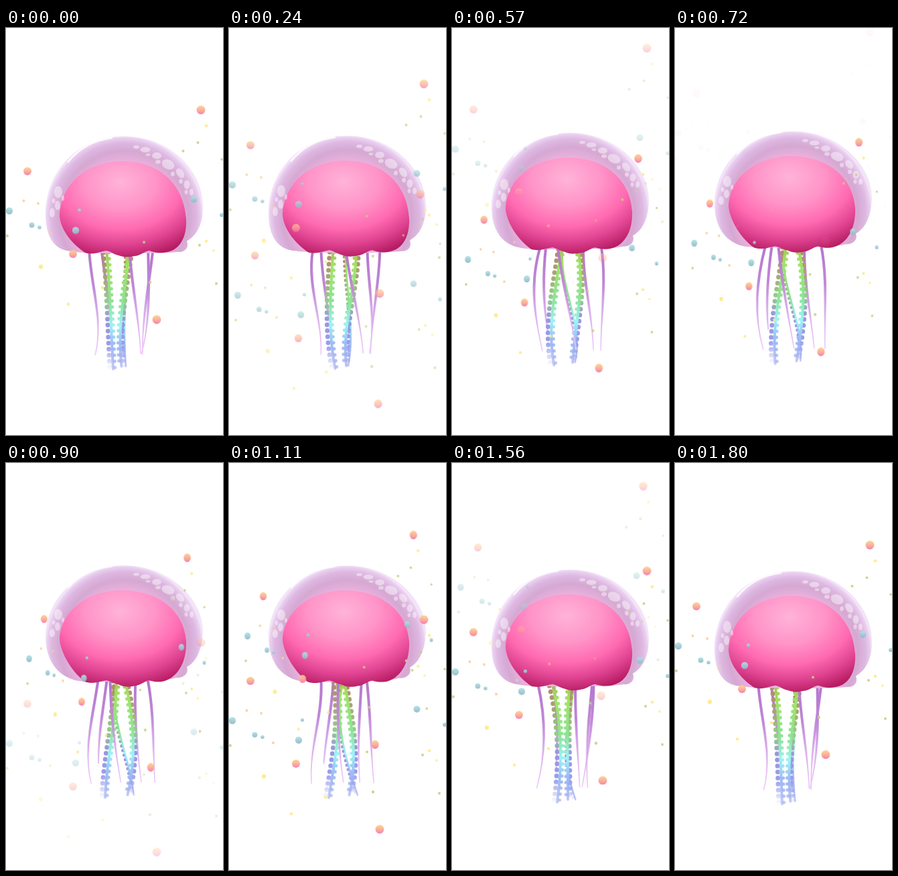
Write an HTML page without scripts that moves like this. It is 324 px wide and 605 px high and loops after 1.83 s.

```html
<!DOCTYPE html>
<html lang="en">
<head>
<meta charset="utf-8">
<title>Jellyfish</title>
<style>
html, body { margin: 0; width: 100%; height: 100%; overflow: hidden; background: #fff; }
svg { display: block; width: 324px; height: 605px; }

.lift, .squash { animation: lift 915ms cubic-bezier(.364,0,.636,1) -1770ms infinite alternate; }
.squash { animation-name: squash; }
@keyframes lift { to { transform: translateY(-10px); } }
@keyframes squash { to { transform: translateY(7.7px) scaleY(.89); } }

/* bubbles rest for the last 30ms of every loop */
.rise, .wrap, .narrow { animation: rise 1830ms linear infinite; }
.wrap { animation-name: wrap; }
.narrow { animation-name: narrow; transform-origin: 174px 0; }
@keyframes rise {
  0% { transform: translateY(164px); opacity: 0; }
  13% { opacity: .65; }
  20%, 70% { opacity: 1; }
  85% { opacity: .45; }
  93% { opacity: 0; }
  98.36%, 100% { transform: translateY(-126px); opacity: 0; }
}
@keyframes wrap {
  0% { transform: translateY(0); opacity: 1; }
  13% { opacity: .78; }
  31% { opacity: .4; }
  41% { opacity: 0; }
  43.7% { transform: translateY(-128.800px); opacity: 0; }
  43.71% { transform: translateY(161px); opacity: 0; }
  49% { opacity: .35; }
  60% { opacity: 1; }
  98.36%, 100% { transform: translateY(0); opacity: 1; }
}
@keyframes narrow {
  49.18% { transform: scaleX(.825); }
  98.36%, 100% { transform: none; }
}

.strands, .ribbons { fill: none; stroke-linecap: round; }
.strands { stroke: url(#violet); stroke-width: 1.7; }
.root { stroke: url(#violetRoot); stroke-width: 4; }
.core { stroke: url(#rainbow); stroke-width: 4; }
.frill, .edge { stroke: url(#frill); stroke-width: 7; stroke-dasharray: 0 9; }
.edge { stroke: url(#rainbow); stroke-width: 5; }
.slim .core { stroke-width: 2.5; }
.slim .frill { stroke-width: 5; stroke-dasharray: 0 7; }

.o { fill: url(#orange); }
.t { fill: url(#teal); }
.y { fill: #fdeb8c; }
.g { fill: #c9d184; }
.p { fill: #fbcf94; }
</style>
</head>
<body>
<svg viewBox="0 0 324 605">
<defs>
  <linearGradient id="orange" x2="0" y2="1">
    <stop offset=".1" stop-color="#fdcb8c"/><stop offset=".55" stop-color="#fba795"/><stop offset="1" stop-color="#f377ab"/>
  </linearGradient>
  <linearGradient id="teal" x2="0" y2="1">
    <stop offset=".1" stop-color="#a9e0e0"/><stop offset="1" stop-color="#97b6c8"/>
  </linearGradient>
  <linearGradient id="violet" gradientUnits="userSpaceOnUse" x1="0" y1="330" x2="0" y2="486">
    <stop stop-color="#b474cc"/><stop offset=".5" stop-color="#cd97e2"/><stop offset="1" stop-color="#f0cffa"/>
  </linearGradient>
  <linearGradient id="violetRoot" gradientUnits="userSpaceOnUse" x1="0" y1="330" x2="0" y2="455">
    <stop stop-color="#b474cc"/><stop offset=".45" stop-color="#c08ad8"/><stop offset="1" stop-color="#dcaeee" stop-opacity="0"/>
  </linearGradient>
  <linearGradient id="rainbow" gradientUnits="userSpaceOnUse" x1="0" y1="334" x2="0" y2="508">
    <stop stop-color="#a8c456"/><stop offset=".12" stop-color="#a0e466"/><stop offset=".42" stop-color="#8ee394"/>
    <stop offset=".62" stop-color="#9af4f4"/><stop offset=".78" stop-color="#9dbcf4"/><stop offset="1" stop-color="#8f9ae8" stop-opacity=".5"/>
  </linearGradient>
  <linearGradient id="frill" gradientUnits="userSpaceOnUse" x1="0" y1="334" x2="0" y2="508">
    <stop stop-color="#b0886c"/><stop offset=".22" stop-color="#a9a674"/><stop offset=".42" stop-color="#93ce8c"/>
    <stop offset=".58" stop-color="#9a94e0"/><stop offset=".8" stop-color="#9a9eec"/><stop offset="1" stop-color="#9a9eec" stop-opacity="0"/>
  </linearGradient>
  <radialGradient id="dome" cx=".5" cy="0" r=".5" gradientTransform="translate(0 .69) scale(1 1.38)">
    <stop offset=".68" stop-color="#ebb2de"/><stop offset=".82" stop-color="#d5a8d2"/>
    <stop offset=".92" stop-color="#ddb8e1"/><stop offset=".98" stop-color="#ead0f0"/><stop offset="1" stop-color="#f3e4f7"/>
  </radialGradient>
  <radialGradient id="pink" cx=".48" cy=".22" r=".8">
    <stop stop-color="#ffb3d8"/><stop offset=".35" stop-color="#ff94c8"/><stop offset=".62" stop-color="#ff6ab1"/>
    <stop offset=".82" stop-color="#de4290"/><stop offset="1" stop-color="#b61c62"/>
  </radialGradient>

  <!-- each curve sways as a cosine part plus a sine part -->
  <path id="s1" d="M131 332C129.2 385 130.3 435 130 486">
    <animate attributeName="d" additive="sum" dur="1.83s" begin="0s" repeatCount="indefinite" calcMode="spline" keyTimes="0;.5;1" keySplines=".364 0 .636 1;.364 0 .636 1" values="M-6.7 0C-2 0 15.6 0 3.2 0;M6.7 0C2 0 -15.6 0 -3.2 0;M-6.7 0C-2 0 15.6 0 3.2 0"/>
    <animate attributeName="d" additive="sum" dur="1.83s" begin="-1.3725s" repeatCount="indefinite" calcMode="spline" keyTimes="0;.5;1" keySplines=".364 0 .636 1;.364 0 .636 1" values="M-2 0C-15.6 0 -1.1 0 6.8 0;M2 0C15.6 0 1.1 0 -6.8 0;M-2 0C-15.6 0 -1.1 0 6.8 0"/>
  </path>
  <path id="s2" d="M147 332C147 374 147 415 148 456">
    <animate attributeName="d" additive="sum" dur="1.83s" begin="0s" repeatCount="indefinite" calcMode="spline" keyTimes="0;.5;1" keySplines=".364 0 .636 1;.364 0 .636 1" values="M-4.1 0C1 0 9.1 0 9.8 0;M4.1 0C-1 0 -9.1 0 -9.8 0;M-4.1 0C1 0 9.1 0 9.8 0"/>
    <animate attributeName="d" additive="sum" dur="1.83s" begin="-1.3725s" repeatCount="indefinite" calcMode="spline" keyTimes="0;.5;1" keySplines=".364 0 .636 1;.364 0 .636 1" values="M-9.1 0C-12.2 0 -7.8 0 -1.7 0;M9.1 0C12.2 0 7.8 0 1.7 0;M-9.1 0C-12.2 0 -7.8 0 -1.7 0"/>
  </path>
  <path id="s3" d="M170 332C172.3 385 180.7 435 186 484">
    <animate attributeName="d" additive="sum" dur="1.83s" begin="0s" repeatCount="indefinite" calcMode="spline" keyTimes="0;.5;1" keySplines=".364 0 .636 1;.364 0 .636 1" values="M14.4 0C15.6 0 18.6 0 15 0;M-14.4 0C-15.6 0 -18.6 0 -15 0;M14.4 0C15.6 0 18.6 0 15 0"/>
    <animate attributeName="d" additive="sum" dur="1.83s" begin="-1.3725s" repeatCount="indefinite" calcMode="spline" keyTimes="0;.5;1" keySplines=".364 0 .636 1;.364 0 .636 1" values="M-7 0C-1.9 0 4.6 0 5.5 0;M7 0C1.9 0 -4.6 0 -5.5 0;M-7 0C-1.9 0 4.6 0 5.5 0"/>
  </path>
  <path id="s4" d="M203 330C201.9 381 205.3 432 202 484">
    <animate attributeName="d" additive="sum" dur="1.83s" begin="0s" repeatCount="indefinite" calcMode="spline" keyTimes="0;.5;1" keySplines=".364 0 .636 1;.364 0 .636 1" values="M9.3 0C10.9 0 10.8 0 .5 0;M-9.3 0C-10.9 0 -10.8 0 -.5 0;M9.3 0C10.9 0 10.8 0 .5 0"/>
    <animate attributeName="d" additive="sum" dur="1.83s" begin="-1.3725s" repeatCount="indefinite" calcMode="spline" keyTimes="0;.5;1" keySplines=".364 0 .636 1;.364 0 .636 1" values="M-3.7 0C-3.2 0 9.6 0 10 0;M3.7 0C3.2 0 -9.6 0 -10 0;M-3.7 0C-3.2 0 9.6 0 10 0"/>
  </path>
  <path id="s5" d="M215 330C217.3 381 210.7 433 213 485">
    <animate attributeName="d" additive="sum" dur="1.83s" begin="0s" repeatCount="indefinite" calcMode="spline" keyTimes="0;.5;1" keySplines=".364 0 .636 1;.364 0 .636 1" values="M4.3 0C-3.6 0 -7.8 0 -9.1 0;M-4.3 0C3.6 0 7.8 0 9.1 0;M4.3 0C-3.6 0 -7.8 0 -9.1 0"/>
    <animate attributeName="d" additive="sum" dur="1.83s" begin="-1.3725s" repeatCount="indefinite" calcMode="spline" keyTimes="0;.5;1" keySplines=".364 0 .636 1;.364 0 .636 1" values="M10.1 0C13.3 0 9.3 0 6.2 0;M-10.1 0C-13.3 0 -9.3 0 -6.2 0;M10.1 0C13.3 0 9.3 0 6.2 0"/>
  </path>
  <path id="r1" d="M156.5 334C159.8 391 152.7 448 153 507">
    <animate attributeName="d" additive="sum" dur="1.83s" begin="0s" repeatCount="indefinite" calcMode="spline" keyTimes="0;.5;1" keySplines=".364 0 .636 1;.364 0 .636 1" values="M-7.1 0C-5 0 3.1 0 6 0;M7.1 0C5 0 -3.1 0 -6 0;M-7.1 0C-5 0 3.1 0 6 0"/>
    <animate attributeName="d" additive="sum" dur="1.83s" begin="-1.3725s" repeatCount="indefinite" calcMode="spline" keyTimes="0;.5;1" keySplines=".364 0 .636 1;.364 0 .636 1" values="M3.6 0C-7.6 0 -12.2 0 .6 0;M-3.6 0C7.6 0 12.2 0 -.6 0;M3.6 0C-7.6 0 -12.2 0 .6 0"/>
  </path>
  <path id="r2" d="M181 334C183.8 390 180.7 446 177 503">
    <animate attributeName="d" additive="sum" dur="1.83s" begin="0s" repeatCount="indefinite" calcMode="spline" keyTimes="0;.5;1" keySplines=".364 0 .636 1;.364 0 .636 1" values="M3.6 0C-6.8 0 -15 0 -4.5 0;M-3.6 0C6.8 0 15 0 4.5 0;M3.6 0C-6.8 0 -15 0 -4.5 0"/>
    <animate attributeName="d" additive="sum" dur="1.83s" begin="-1.3725s" repeatCount="indefinite" calcMode="spline" keyTimes="0;.5;1" keySplines=".364 0 .636 1;.364 0 .636 1" values="M9.3 0C13.3 0 -2.9 0 1.6 0;M-9.3 0C-13.3 0 2.9 0 -1.6 0;M9.3 0C13.3 0 -2.9 0 1.6 0"/>
  </path>
  <path id="r3" d="M173 334C166.5 390 179.5 446 185 503">
    <animate attributeName="d" additive="sum" dur="1.83s" begin="0s" repeatCount="indefinite" calcMode="spline" keyTimes="0;.5;1" keySplines=".364 0 .636 1;.364 0 .636 1" values="M7.4 0C13.8 0 -5.4 0 -5.9 0;M-7.4 0C-13.8 0 5.4 0 5.9 0;M7.4 0C13.8 0 -5.4 0 -5.9 0"/>
    <animate attributeName="d" additive="sum" dur="1.83s" begin="-1.3725s" repeatCount="indefinite" calcMode="spline" keyTimes="0;.5;1" keySplines=".364 0 .636 1;.364 0 .636 1" values="M-5.2 0C-2.2 0 17.3 0 -3.7 0;M5.2 0C2.2 0 -17.3 0 3.7 0;M-5.2 0C-2.2 0 17.3 0 -3.7 0"/>
  </path>

  <g id="swarm" opacity=".92">
    <g class="o"><circle cx="291" cy="122" r="6.5"/><circle cx="32" cy="213" r="6"/><circle cx="100" cy="336" r="6"/><circle cx="225" cy="433.5" r="6.5"/></g>
    <g class="t"><circle cx="5" cy="272" r="5.2"/><circle cx="38.5" cy="293" r="4"/><circle cx="50" cy="296.5" r="2.8"/><circle cx="104" cy="301" r="5.2"/><circle cx="280.5" cy="255" r="5"/><circle cx="322" cy="278" r="3"/><circle cx="109.5" cy="271" r="2.6"/></g>
    <g class="y"><circle cx="299" cy="145.5" r="2.3"/><circle cx="52" cy="355" r="3.2"/><circle cx="93" cy="410.5" r="2.3"/><circle cx="144" cy="386" r="2.3"/><circle cx="299" cy="317" r="2.2"/><circle cx="310" cy="331" r="1.8"/></g>
    <g class="g"><circle cx="286.5" cy="170.5" r="2"/><circle cx="264.5" cy="183" r="2"/><circle cx="322" cy="195.5" r="1.7"/><circle cx="289" cy="323" r="2"/><circle cx="314" cy="380" r="2"/><circle cx="215" cy="378" r="2.2"/><circle cx="2" cy="309" r="2"/><circle cx="206" cy="318.5" r="2"/></g>
    <g class="p"><circle cx="26.5" cy="257" r="1.9"/><circle cx="48" cy="261" r="1.9"/><circle cx="66" cy="305" r="2"/></g>
  </g>
</defs>

<g class="lift">
  <g class="strands">
    <use href="#s2"/><use href="#s2" class="root"/>
    <use href="#s4"/><use href="#s4" class="root"/>
    <use href="#s5"/><use href="#s5" class="root"/>
    <use href="#s1"/><use href="#s1" class="root"/>
  </g>
  <g class="ribbons">
    <g class="slim"><use href="#r3" class="frill" x="-2"/><use href="#r3" class="core"/></g>
    <g><use href="#r2" class="frill" x="3"/><use href="#r2" class="edge" x="-3"/><use href="#r2" class="core"/></g>
    <g><use href="#r1" class="frill" x="-4"/><use href="#r1" class="edge" x="4"/><use href="#r1" class="core" x="1"/></g>
  </g>
  <g class="strands"><use href="#s3"/><use href="#s3" class="root"/></g>
</g>

<path fill="url(#dome)" d="M59 284C56 215 106 161 176 161C246 161 296 214 294 268C294 290 286 308 270 317C274 328 266 334 257 333C240 336 110 336 100 332C76 332 61 316 59 284Z">
  <animate attributeName="d" dur="1.83s" begin="-1.77s" repeatCount="indefinite" calcMode="spline" keyTimes="0;.5;1" keySplines=".364 0 .636 1;.364 0 .636 1" values="M59 284C56 215 106 161 176 161C246 161 296 214 294 268C294 290 286 308 270 317C274 328 266 334 257 333C240 336 110 336 100 332C76 332 61 316 59 284Z;M59 262C58 200 110 152 176 152C242 152 294 200 294 250C293 276 285 295 270 303C274 314 263 320 253 319C240 326 110 326 104 323C78 316 61 296 59 262Z;M59 284C56 215 106 161 176 161C246 161 296 214 294 268C294 290 286 308 270 317C274 328 266 334 257 333C240 336 110 336 100 332C76 332 61 316 59 284Z"/>
</path>
<path fill="url(#pink)" d="M80 280C82 230 122 198 174 198C228 198 266 232 269 284C270 305 264 322 250 330C236 336 224 335 214 331C206 332 202 338 192 339C184 341 176 341 168 338C160 336 156 332 150 331C140 332 132 338 118 334C100 322 82 302 80 280Z">
  <animate attributeName="d" dur="1.83s" begin="-1.77s" repeatCount="indefinite" calcMode="spline" keyTimes="0;.5;1" keySplines=".364 0 .636 1;.364 0 .636 1" values="M80 280C82 230 122 198 174 198C228 198 266 232 269 284C270 305 264 322 250 330C236 336 224 335 214 331C206 332 202 338 192 339C184 341 176 341 168 338C160 336 156 332 150 331C140 332 132 338 118 334C100 322 82 302 80 280Z;M80 262C82 219 122 189 174 189C228 189 266 220 269 264C270 288 262 308 248 318C236 327 224 326 214 323C206 324 202 330 192 331C184 333 176 333 168 329C160 327 156 324 150 323C140 324 132 329 118 325C100 312 82 284 80 262Z;M80 280C82 230 122 198 174 198C228 198 266 232 269 284C270 305 264 322 250 330C236 336 224 335 214 331C206 332 202 338 192 339C184 341 176 341 168 338C160 336 156 332 150 331C140 332 132 338 118 334C100 322 82 302 80 280Z"/>
</path>

<g class="squash">
  <path d="M93 199C108 180 130 167 158 163.5" fill="none" stroke="#fff" stroke-opacity=".85" stroke-width="2.5" stroke-linecap="round"/>
  <g fill="#fff" fill-opacity=".45">
    <ellipse cx="78" cy="244" rx="6" ry="9"/><ellipse cx="71" cy="257" rx="2.5" ry="3.5"/><ellipse cx="77" cy="264" rx="4" ry="7"/><ellipse cx="69" cy="275" rx="4" ry="7"/><ellipse cx="85" cy="253" rx="2" ry="4"/>
    <ellipse cx="194.5" cy="177" rx="4.5" ry="2.5"/><ellipse cx="208" cy="181" rx="7.5" ry="4"/><ellipse cx="212" cy="188.5" rx="3.5" ry="2"/><ellipse cx="225" cy="190" rx="7" ry="5"/><ellipse cx="227" cy="199" rx="4" ry="3"/>
    <ellipse cx="242" cy="203" rx="10" ry="7" transform="rotate(25 242 203)"/><ellipse cx="249" cy="217" rx="3" ry="3.5"/><ellipse cx="260" cy="216" rx="5" ry="8" transform="rotate(-35 260 216)"/><ellipse cx="261" cy="228" rx="3" ry="3.5"/>
    <ellipse cx="270" cy="233" rx="4.5" ry="6.5"/><ellipse cx="269" cy="244" rx="2.5" ry="3.5"/><ellipse cx="277" cy="244" rx="3" ry="5"/>
  </g>
</g>

<g class="wrap"><use href="#swarm"/></g>
<g class="narrow"><g class="rise"><use href="#swarm"/></g></g>
</svg>
</body>
</html>
```
